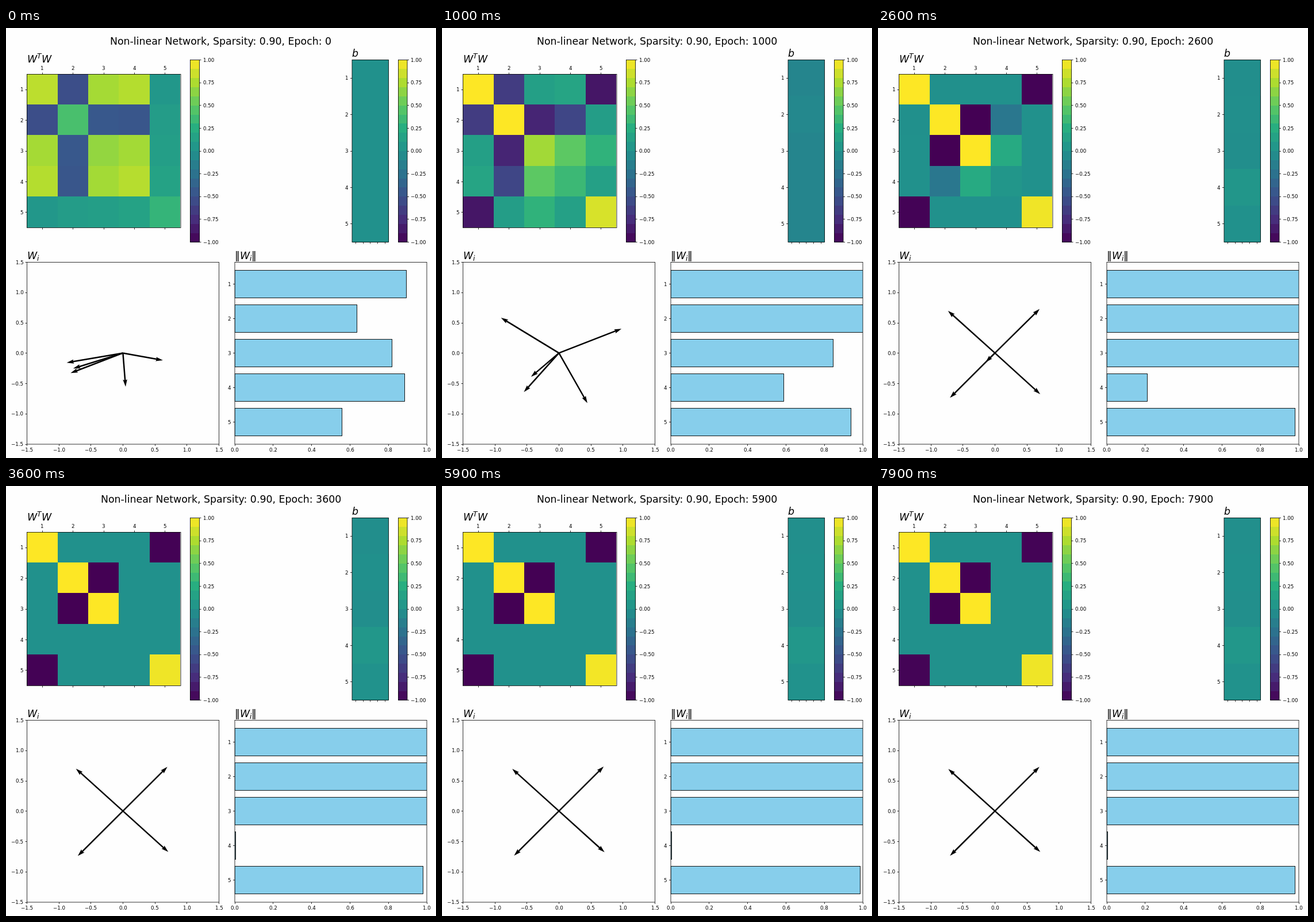
Write an HTML page with a canvas that moves like this. It is 748x748 px and loops after 8000 ms.

```html
<!DOCTYPE html>
<html lang="en">
<head>
<meta charset="utf-8">
<title>Network training</title>
<style>
  html, body { margin: 0; width: 100%; height: 100%; overflow: hidden; background: #fefefe; }
  canvas { display: block; width: 100vw; height: 100vh; }
</style>
</head>
<body>
<canvas id="stage" width="748" height="748"></canvas>
<script>
const ctx = document.getElementById('stage').getContext('2d');
const LOOP = 8000, STEP = 100;
const PT = 0.868;
const FONT = '"DejaVu Sans", Verdana, sans-serif';
const INK = '#000', PAPER = '#fefefe';
const EARLY = 300, MID = 1000;
const TILT = 46.4;

// Length and angle at the start, EARLY and MID; then each vector settles
// on a quarter turn of one tilted cross. Biases dip with a lag, then rest.
const UNITS = [
  { len: [.893, .806, 1.076], deg: [190.3, 177.8, 147.3], turn: 1,  end: 1.01, lag: 100, rest: -.02 },
  { len: [.636, .910, 1.056], deg: [-10.9, -15.5, 22.3],  turn: 0,  end: 1.01, lag: 800, rest: -.01 },
  { len: [.818, .638, .845],  deg: [198.2, 196.4, 229.6], turn: 2,  end: 1.02, lag: 100, rest: -.02 },
  { len: [.882, .680, .586],  deg: [202, 201.8, 221.9],   turn: 2,  end: 0,    lag: 100, rest: .05 },
  { len: [.556, .827, .938],  deg: [-85.7, -91.1, -61.7], turn: -1, end: .982, lag: 100, rest: .01 }
];

const VIRIDIS = ['440154', '472d7b', '3b528b', '2c728e', '21918c',
  '28ae80', '5ec962', 'addc30', 'fde725']
  .map(h => [0, 2, 4].map(i => parseInt(h.slice(i, i + 2), 16)));

function viridis(v) {
  const last = VIRIDIS.length - 1;
  const t = Math.min(1, Math.max(0, (v + 1) / 2)) * last;
  const i = Math.min(last - 1, Math.floor(t));
  const mix = VIRIDIS[i].map((c, k) => Math.round(c + (VIRIDIS[i + 1][k] - c) * (t - i)));
  return `rgb(${mix})`;
}

// Parabola through the values at 0, EARLY and MID
function curve([a, b, c], e) {
  const s1 = (b - a) / EARLY, s2 = (c - b) / (MID - EARLY);
  return a + s1 * e + (s2 - s1) / MID * e * (e - EARLY);
}

const decay = (epoch, tau) => Math.exp(-Math.max(0, epoch - MID) / tau);

function settle(keys, end, epoch) {
  return end + (curve(keys, Math.min(epoch, MID)) - end) * decay(epoch, 350);
}

function wobble(seed) {
  const r = Math.sin(seed * 12.9898) * 43758.5453;
  return (r - Math.floor(r) - 0.5) * 0.008;
}

function weight(unit, i, epoch) {
  const angle = settle(unit.deg, TILT + 90 * unit.turn, epoch) * Math.PI / 180;
  const fading = Math.max(0.003, unit.len[2] - (epoch - MID) * 0.000234);
  let len = !unit.end && epoch > MID ? fading : settle(unit.len, unit.end, epoch);
  if (epoch > MID) len *= 1 + wobble(epoch / STEP + i * 97);
  return [len * Math.cos(angle), len * Math.sin(angle)];
}

function bias(unit, epoch) {
  const fade = decay(epoch, 600);
  return -0.1 * (1 - Math.exp(-epoch / unit.lag)) * fade + unit.rest * (1 - fade);
}

// Glyphs start on whole pixels; align is 0 left, 0.5 centre, 1 right
function text(str, x, y, align = 0, size = 10, style = '') {
  ctx.font = `${style} ${size * PT}px ${FONT}`;
  ctx.fillStyle = INK;
  ctx.fillText(str, Math.round(x - align * ctx.measureText(str).width), Math.round(y));
}

const math = (str, x, y, size = 20) => text(str, x, y, 0, size, 'italic');
const snap = v => Math.floor(v) + 0.5;
const num = (v, digits) => v.toFixed(digits).replace('-', '\u2212');

function line(x1, y1, x2, y2) {
  ctx.lineWidth = 0.8;
  ctx.strokeStyle = INK;
  ctx.beginPath();
  ctx.moveTo(x1, y1);
  ctx.lineTo(x2, y2);
  ctx.stroke();
}

function frame(x, y, w, h) {
  ctx.lineWidth = 0.8;
  ctx.strokeStyle = INK;
  ctx.strokeRect(x, y, w, h);
}

function leftTick(x, y, label) {
  line(x - 3, snap(y), x, snap(y));
  text(label, x - 6.1, y + 3.2, 1);
}

function bottomTick(x, y, label) {
  line(snap(x), y, snap(x), y + 3);
  if (label) text(label, x, y + 12.8, 0.5);
}

function colorbar(x, w) {
  const top = 55.5, h = 317, bands = 20;
  for (let i = 0; i < bands; i++) {
    const y = Math.round(top + i * h / bands);
    ctx.fillStyle = viridis(1 - (2 * i + 1) / bands);
    ctx.fillRect(x, y, w, top + h - y);
  }
  frame(x, top, w, h);
  for (let i = 0; i <= 8; i++) {
    const y = top + i * h / 8;
    line(x + w, snap(y), x + w + 3, snap(y));
    text(num(1 - i / 4, 2), x + w + 6.1, y + 3.2);
  }
}

function drawGram(w) {
  const x = 36.5, y = 80.5, size = 267, cell = size / 5;
  const col = i => Math.floor(36.7 + i * cell), row = i => Math.floor(80 + i * cell);
  for (let r = 0; r < 5; r++) for (let c = 0; c < 5; c++) {
    ctx.fillStyle = viridis(w[r][0] * w[c][0] + w[r][1] * w[c][1]);
    ctx.fillRect(col(c), row(r), col(c + 1) - col(c), row(r + 1) - row(r));
  }
  frame(x, y, size + 0.5, size);
  for (let i = 0; i < 5; i++) {
    const mid = (i + 0.5) * cell;
    line(snap(x + mid), y - 3, snap(x + mid), y);
    text(i + 1, x + mid, 72.7, 0.5);
    bottomTick(x + mid, y + size);
    leftTick(x, y + mid, i + 1);
  }
  math('W', 36.5, 59.5);
  math('T', 54, 52.9, 14);
  math('W', 62.2, 59.5);
  colorbar(320.5, 16);
}

function drawBias(b) {
  const x = 602, y = 55.5, w = 63.5, h = 317;
  b.forEach((v, i) => {
    const top = Math.round(55 + i * h / 5);
    ctx.fillStyle = viridis(v);
    ctx.fillRect(x, top, w, y + h - top);
  });
  frame(x, y, w, h);
  for (let i = 0; i < 5; i++) {
    bottomTick(x + (i + 0.5) * w / 5, y + h);
    leftTick(x, y + (i + 0.5) * h / 5, i + 1);
  }
  math('b', 602, 49.5);
  colorbar(682.5, 15.5);
}

function arrow(x, y, dx, dy) {
  const len = Math.hypot(dx, dy), unit = 2.5;
  ctx.fillStyle = INK;
  ctx.beginPath();
  if (len < unit) {
    ctx.arc(x, y, unit / 2, 0, 7);
    ctx.fill();
    return;
  }
  const s = unit * Math.min(1, len / (5 * unit));
  const neck = len - 4.5 * s, barb = len - 5 * s;
  ctx.save();
  ctx.translate(x, y);
  ctx.rotate(Math.atan2(dy, dx));
  ctx.moveTo(0, -s / 2);
  ctx.lineTo(neck, -s / 2);
  ctx.lineTo(barb, -1.5 * s);
  ctx.lineTo(len, 0);
  ctx.lineTo(barb, 1.5 * s);
  ctx.lineTo(neck, s / 2);
  ctx.lineTo(0, s / 2);
  ctx.fill();
  ctx.restore();
}

function drawVectors(w) {
  const x = 36.5, y = 407.5, width = 334, height = 316.5;
  for (const [wx, wy] of w) arrow(203.4, 565.4, wx * width / 3, -wy * height / 3);
  frame(x, y, width, height);
  for (let i = 0; i <= 6; i++) {
    const label = num(-1.5 + i / 2, 1);
    bottomTick(x + i * width / 6, y + height, label);
    leftTick(x, y + height - i * height / 6, label);
  }
  math('W', 36.5, 402);
  math('i', 54.4, 404.8, 14);
}

function drawNorms(w) {
  const x = 398, y = 407.5, width = 334, height = 316.5, pitch = 60.05;
  ctx.save();
  ctx.beginPath();
  ctx.rect(x, y, width, height);
  ctx.clip();
  w.forEach(([wx, wy], i) => {
    const end = snap(x + Math.hypot(wx, wy) * width + 0.5);
    const box = [x, snap(421.5 + i * pitch), end - x, 48];
    ctx.fillStyle = '#87ceeb';
    ctx.fillRect(...box);
    ctx.lineWidth = 0.9;
    ctx.strokeStyle = INK;
    ctx.strokeRect(...box);
  });
  ctx.restore();
  frame(x, y, width, height);
  for (let i = 0; i < 5; i++) leftTick(x, 445.5 + i * pitch, i + 1);
  for (let i = 0; i <= 5; i++) bottomTick(x + i * width / 5, y + height, num(i / 5, 1));
  text('\u2016', 398, 402, 0, 20);
  math('W', 406.7, 402);
  math('i', 424.4, 404.8, 14);
  text('\u2016', 427.4, 402, 0, 20);
}

function draw(epoch) {
  const w = UNITS.map((unit, i) => weight(unit, i, epoch));
  ctx.fillStyle = PAPER;
  ctx.fillRect(0, 0, 748, 748);
  text(`Non-linear Network, Sparsity: 0.90, Epoch: ${epoch}`, 374, 29, 0.5, 20);
  drawGram(w);
  drawBias(UNITS.map(unit => bias(unit, epoch)));
  drawVectors(w);
  drawNorms(w);
}

const start = performance.now();
let shown = -1;
function tick() {
  const t = (performance.now() - start) % LOOP;
  const epoch = Math.floor(t / STEP) * STEP;
  if (epoch !== shown) draw(shown = epoch);
  requestAnimationFrame(tick);
}
tick();
</script>
</body>
</html>
```
